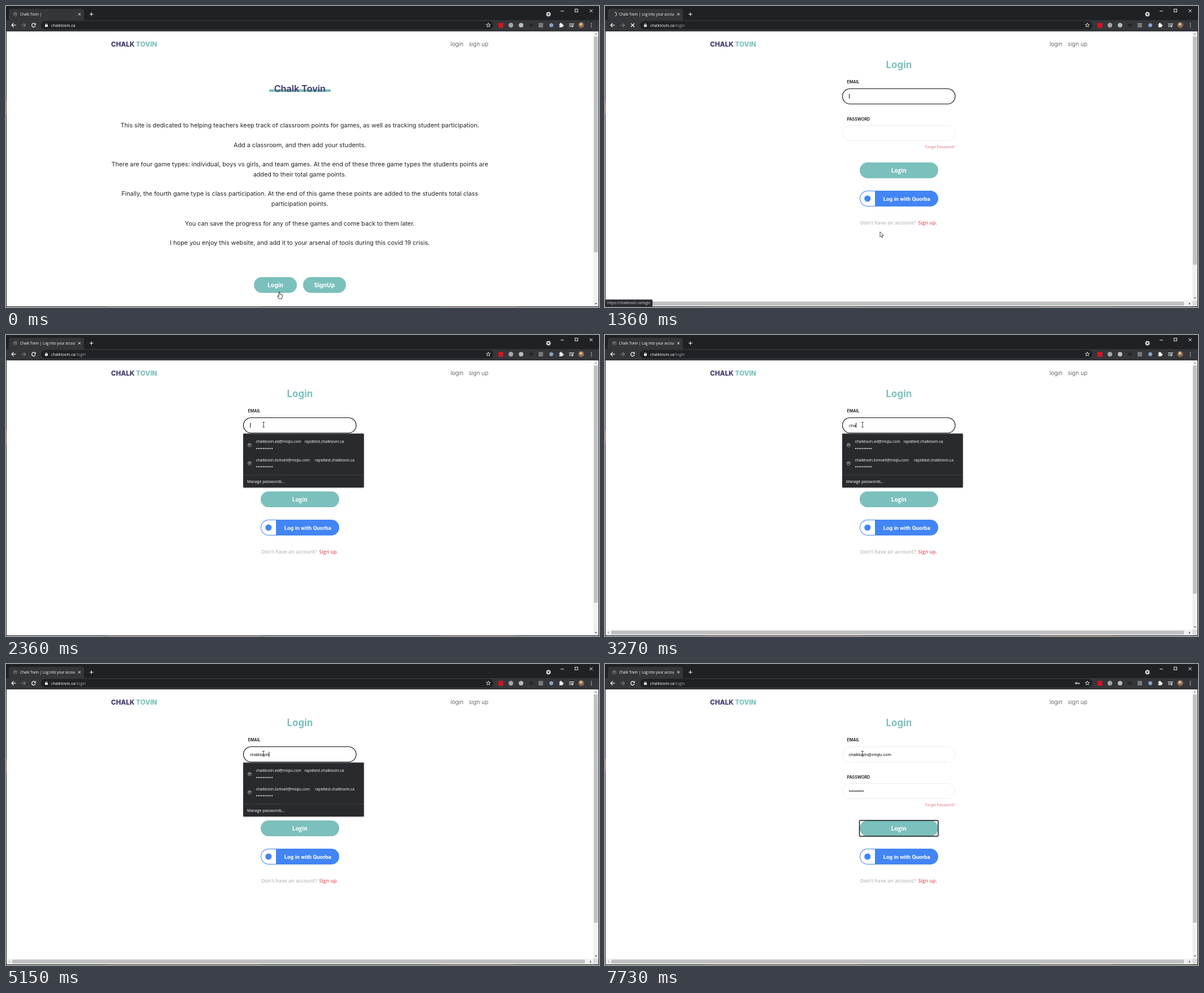
Animation of 1050x533 px, one loop 8000 ms. Source, as an HTML page with a canvas:

```html
<!DOCTYPE html>
<html lang="en">
<head>
<meta charset="utf-8">
<title>Login walkthrough</title>
<style>
html, body { margin: 0; width: 100%; height: 100%; overflow: hidden; background: #fff; }
canvas { display: block; }
</style>
</head>
<body>
<canvas id="stage" width="1050" height="533"></canvas>
<script>
const c = document.getElementById('stage').getContext('2d');
const LOOP = 8000;
const TEAL = '#7bc0bc', NAVY = '#43396a', BLUE = '#4285f4', PINK = '#e4767f', ICON = '#dfe1e5';
const SITE = 'Chalk Tovin', HOST = 'chalktovin.ca', MAIL = '@miqlu.com';

// Timeline in ms
const T = { load: 480, status: 470, commit: 1260, statusOff: 1850, loaded: 2010, click: 2360, hbar: 2880, tab: 6400, submit: 7730 };
const POPUPS = [[2360, 4530], [5120, 5350]];
const KEYS = [
  [2990, 'c'], [3110, 'h'], [3250, 'a'], [3300, 'l'], [3400, 'k'], [3500, 't'],
  [3660, 'o'], [3710, 'v'], [3760, 'i'], [3810, 'n'], [4530, 'E'], [4560, 'd'],
  [4990, '<'], [5090, '<'], [5350, '@'], [5510, 'm'], [5590, 'i'], [5660, 'q'],
  [5740, 'l'], [5820, 'u'], [6020, '.'], [6110, 'c'], [6210, 'o'], [6310, 'm']
];
const PASS_START = 6660, PASS_STEP = 85.5, PASS_LEN = 10;
const PATH = [
  [0, 484, 506], [30, 484, 506], [70, 483, 513], [150, 482, 521], [450, 482, 521], [500, 481, 505],
  [1240, 481, 505], [1270, 482, 494], [1360, 487, 400.5], [1500, 480, 300], [1700, 463, 205],
  [2040, 456.5, 169], [2110, 456.5, 166.5], [2200, 456.5, 166.5], [2320, 456, 158.5]
];

const inter = (w, s) => `${w} ${s}px Inter, sans-serif`;
const open = (w, s) => `${w} ${s}px "Open Sans", sans-serif`;
const FIELD = '7.5px "Liberation Sans", Arial, sans-serif';

function rect(x, y, w, h, fill) {
  c.fillStyle = fill;
  c.fillRect(x, y, w, h);
}
function round(x, y, w, h, r, fill, stroke, lw) {
  c.beginPath();
  c.roundRect(x, y, w, h, r);
  if (fill) { c.fillStyle = fill; c.fill(); }
  if (stroke) { c.strokeStyle = stroke; c.lineWidth = lw; c.stroke(); }
}
function disc(x, y, r, fill) {
  c.fillStyle = fill;
  c.beginPath();
  c.arc(x, y, r, 0, Math.PI * 2);
  c.fill();
}
function arc(x, y, r, a, b, color, lw) {
  c.strokeStyle = color;
  c.lineWidth = lw;
  c.beginPath();
  c.arc(x, y, r, a, b);
  c.stroke();
}
// Polyline through a flat list of coordinates
function poly(p, fill, stroke, lw) {
  c.beginPath();
  for (let i = 0; i < p.length; i += 2) c.lineTo(p[i], p[i + 1]);
  if (fill) { c.closePath(); c.fillStyle = fill; c.fill(); }
  if (stroke) { c.strokeStyle = stroke; c.lineWidth = lw; c.stroke(); }
}
function text(s, x, y, font, color, align = 'left') {
  c.font = font;
  c.fillStyle = color;
  c.textAlign = align;
  c.fillText(s, x, y);
  return c.measureText(s).width;
}
function cross(x, y, r, color, lw) {
  poly([x - r, y - r, x + r, y + r], null, color, lw);
  poly([x + r, y - r, x - r, y + r], null, color, lw);
}
function dots(n, x, y, step, r, color) {
  for (let i = 0; i < n; i++) disc(x + i * step, y, r, color);
}
function globe(x, y, color) {
  arc(x, y, 3.2, 0, 7, color, 0.8);
  poly([x - 2.4, y - 1.5, x, y - 1.8, x + .8, y, x - .8, y + .8, x - .4, y + 2.4], color);
  poly([x + 1, y - 2.6, x + 2.6, y - .6, x + 1.4, y + .8], color);
}

function chrome(t) {
  const login = t >= T.commit, loading = t >= T.load && t < T.loaded;
  rect(0, 0, 1050, 533, '#202124');
  round(5, 5, 133, 24, 4, '#35363a');
  rect(0, 25, 1050, 20, '#35363a');
  round(62, 26.5, 801, 15, 7.5, '#202124');

  if (loading) {
    const dir = login ? 1 : -1;
    const a = dir * (t - 1360) / 1000 * Math.PI * 2 - Math.PI / 2;
    arc(17, 14.5, 3.6, a, a + Math.PI * (login ? .9 : .5), login ? '#e8eaed' : '#9aa0a6', 1);
  } else globe(16.5, 14.5, '#85888c');
  c.save();
  c.beginPath();
  c.rect(24, 6, 98, 18);
  c.clip();
  text(SITE + ' |' + (login ? ' Log into your account' : ''), 25, 17, open(500, 6.3), '#fff');
  c.restore();
  cross(130, 14.5, 2, '#fff', 1);
  poly([148, 14.5, 154.5, 14.5], null, '#fff', 1);
  poly([151.2, 11.2, 151.2, 17.8], null, '#fff', 1);

  // window buttons
  disc(960.5, 14.5, 4, '#cfd1d4');
  poly([958.4, 13.4, 962.6, 13.4, 960.5, 16.2], '#202124');
  rect(982, 8.5, 6, 1, '#e8eaed');
  c.strokeStyle = '#e8eaed';
  c.lineWidth = 1;
  c.strokeRect(1007.5, 5.5, 5, 5);
  cross(1036, 8.5, 2.6, '#fff', 1);

  // navigation
  poly([17.5, 34, 10, 34], null, '#fff', 1.2);
  poly([13.6, 30.4, 10, 34, 13.6, 37.6], null, '#fff', 1.2);
  poly([27, 34, 34.5, 34], null, '#808387', 1.1);
  poly([31, 30.4, 34.6, 34, 31, 37.6], null, '#808387', 1.1);
  if (loading) cross(49, 34, 3, '#fff', 1.2);
  else {
    arc(49, 34, 3.2, .3, 5.3, '#fff', 1.2);
    poly([52.8, 30, 52.8, 33.4, 49.4, 33.4], '#fff');
  }
  rect(69, 33, 5, 4, ICON);
  arc(71.5, 32.8, 1.5, Math.PI, 0, ICON, .9);
  const w = text(HOST, 80, 36.6, open(500, 7.1), '#fff');
  if (login) text('/login', 80 + w, 36.6, open(500, 7.1), '#9aa0a6');

  if (t >= PASS_START) {
    arc(834.3, 34, 1.5, 0, 7, ICON, 1.1);
    rect(836, 33.4, 4.5, 1.3, ICON);
    rect(838.4, 34, 1.2, 2, ICON);
  }
  const star = [];
  for (let i = 0; i <= 10; i++) {
    const a = i * Math.PI / 5 - Math.PI / 2, r = i % 2 ? 1.7 : 3.9;
    star.push(854 + r * Math.cos(a), 34 + r * Math.sin(a));
  }
  poly(star, null, ICON, .9);

  // extensions
  rect(872, 30, 8.5, 8.5, '#d9131f');
  disc(894, 34, 4.2, '#a4a6a9');
  disc(912, 34, 4, '#b9bbbe');
  rect(926, 31.5, 7.5, 5, '#25262a');
  rect(943, 30, 8, 8, '#77797d');
  disc(965.5, 34, 3.5, '#8aa0c8');
  rect(979.6, 31.6, 6, 6, '#f1f3f4');
  disc(982.4, 31.2, 1.4, '#f1f3f4');
  disc(986, 34.6, 1.4, '#f1f3f4');
  disc(979.8, 34.8, 1, '#35363a');
  for (let i = 0; i < 3; i++) {
    rect(997, 31 + i * 2.4, i < 2 ? 6.4 : 4, 1, ICON);
    disc(1036.5, 31 + i * 3, .85, ICON);
  }
  rect(1003.6, 31, 1, 5, ICON);
  rect(1003.6, 31, 2.4, 1, ICON);
  disc(1002.8, 36.3, 1.4, ICON);
  disc(1018.5, 33.8, 5.2, '#8b6a48');
  disc(1018, 32.5, 2.4, '#d8c09c');
}

function scrollbars(thumbEnd, horizontal) {
  const end = horizontal ? 522 : 532;
  rect(1040, 45, 9, end - 45, '#f1f1f1');
  rect(1041, 54, 7, thumbEnd - 54, '#c1c1c1');
  poly([1042.4, 50.5, 1044.5, 48.2, 1046.6, 50.5], '#8a8a8a');
  poly([1042.4, end - 6, 1044.5, end - 3.7, 1046.6, end - 6], '#505050');
  if (!horizontal) return;
  rect(1, 522, 1039, 10, '#f1f1f1');
  rect(1040, 522, 9, 10, '#dcdcdc');
  rect(11, 523.5, 1014, 7, '#c1c1c1');
  poly([7, 525, 4.7, 527.1, 7, 529.2], '#a3a3a3');
  poly([1034, 525, 1036.3, 527.1, 1034, 529.2], '#505050');
}

function header() {
  const [a, b] = SITE.toUpperCase().split(' ');
  const w = text(a + ' ', 186, 71.5, inter(800, 11.7), NAVY);
  text(b, 186 + w, 71.5, inter(800, 11.7), TEAL);
  text('login', 787, 70.5, inter(300, 10.3), '#444');
  text('sign up', 854, 70.5, inter(300, 10.1), '#444', 'right');
}

const INTRO = [
  [215, 'This site is dedicated to helping teachers keep track of classroom points for games, as well as tracking student participation.'],
  [249.5, 'Add a classroom, and then add your students.'],
  [284, 'There are four game types: individual, boys vs girls, and team games. At the end of these three game types the students points are'],
  [302, 'added to their total game points.'],
  [336, 'Finally, the fourth game type is class participation. At the end of this game these points are added to the students total class'],
  [354, 'participation points.'],
  [388.5, 'You can save the progress for any of these games and come back to them later.'],
  [423, 'I hope you enjoy this website, and add it to your arsenal of tools during this covid 19 crisis.']
];

function home() {
  rect(466, 147.5, 109, 4.5, TEAL);
  text(SITE, 520.3, 152, inter(600, 16.2), NAVY, 'center');
  for (const [y, s] of INTRO) text(s, 520.2, y, inter(400, 10.8), '#212529', 'center');
  round(439, 480, 76, 28, 14, TEAL);
  text('Login', 477, 498, inter(700, 10.4), '#fff', 'center');
  round(526, 480, 76, 28, 14, TEAL);
  text('SignUp', 563.8, 498, inter(700, 10.4), '#fff', 'center');
  scrollbars(436, false);
}

function field(y, focused) {
  const color = focused ? '#101010' : '#ececee';
  round(420.5, y + .5, 199.5, 27, 13.5, '#fff', color, focused ? 1.15 : .9);
}

function typed(t) {
  let s = '';
  for (const [at, k] of KEYS) if (t >= at) s = k === '<' ? s.slice(0, -1) : s + k;
  return s;
}

// The caret restarts its blink after every key or focus change
function caretOn(t, dotCount) {
  let last = T.commit + 40;
  for (const at of [T.click, T.tab, ...KEYS.map(k => k[0])]) if (t >= at) last = Math.max(last, at);
  if (dotCount) last = PASS_START + (dotCount - 1) * PASS_STEP;
  return t >= last && Math.floor((t - last) / 520) % 2 === 0;
}

function form(t) {
  const onMail = t < T.tab, onPass = !onMail && t < T.submit;
  text('Login', 520.4, 110, inter(700, 16.9), TEAL, 'center');
  text('EMAIL', 428.5, 137.3, inter(600, 7.1), '#111');
  text('PASSWORD', 428.5, 202.5, inter(600, 7.1), '#111');
  field(146, onMail);
  field(211, onPass);

  const n = Math.max(0, Math.min(PASS_LEN, Math.floor((t - PASS_START) / PASS_STEP) + 1));
  const w = text(typed(t), onMail ? 432 : 431.5, 162.5, FIELD, '#111');
  dots(n, 433, 225, 2.65, 1, '#111');
  if (caretOn(t, n)) {
    if (onMail) rect(432 + w, 155.5, 1, 8.5, '#111');
    else if (onPass) rect(432 + n * 2.65, 220.5, 1, 8.5, '#111');
  }
  text('Forgot Password?', 620, 251.6, inter(400, 6.3), PINK, 'right');

  round(451, 277, 139, 28, 14, TEAL);
  if (t >= T.submit) round(450.5, 277, 139.5, 28, 1.5, null, '#101010', 1.4);
  text('Login', 520.3, 294.8, open(700, 10), '#fff', 'center');

  round(451, 327, 139, 28, 14, BLUE);
  round(452, 328, 26, 26, [13, 0, 0, 13], '#fff');
  disc(464.8, 341, 5.6, BLUE);
  text('Log in with Quorba', 534.3, 344.7, '700 9.9px Roboto, sans-serif', '#fff', 'center');

  text('Don\'t have an account?', 452, 387.2, open(600, 8.8), '#bcbcbc');
  text('Sign up.', 588, 387.2, open(600, 8.8), '#e0606f', 'right');

  const hbar = t < T.loaded || t >= T.hbar;
  scrollbars(hbar ? 458 : 474, hbar);
  if (POPUPS.some(([a, b]) => t >= a && t < b)) popup();
}

function popup() {
  const font = open(500, 6.7), white = '#fff';
  c.save();
  c.shadowColor = 'rgba(0,0,0,.35)';
  c.shadowBlur = 2;
  c.shadowOffsetY = 1;
  round(420, 174.5, 213.7, 95.5, 1, '#292a2d');
  c.restore();
  [['chalktovin.ed', 528.5], ['chalktovin.tomvell', 547]].forEach(([user, x], i) => {
    const y = 191.3 + i * 32.3;
    globe(431.3, y + 3.6, '#a5a8ac');
    text(user + MAIL, 442.5, y, font, white);
    text('rapidtest.' + HOST, x, y, font, white);
    dots(10, 443.8, y + 9.7, 3.05, .95, white);
  });
  rect(420, 247.5, 213.7, .8, '#46474b');
  text('Manage passwords...', 427, 261.8, open(500, 6.8), white);
}

function status() {
  round(0, 520, 84, 13, [0, 2, 0, 0], '#292a2d', '#4a4c50', .7);
  text('https://' + HOST + '/login', 4, 528.4, open(500, 6.35), '#d0d3d7');
}

function pointerAt(t) {
  const i = PATH.findIndex(p => p[0] > t);
  if (i < 0) return PATH[PATH.length - 1].slice(1);
  const [a, x, y] = PATH[i - 1], [b, u, v] = PATH[i], k = (t - a) / (b - a);
  return [x + (u - x) * k, y + (v - y) * k];
}

function pointer(t) {
  const [x, y] = pointerAt(t);
  const within = (a, b) => y >= a && y <= b;
  let kind = 'arrow';
  if (t < T.commit) kind = y < 508 ? 'hand' : 'arrow';
  else if (within(277, 305) || within(327, 355)) kind = 'hand';
  else if (within(146, 174) || within(211, 239)) kind = 'beam';

  c.save();
  c.translate(x, y);
  c.lineJoin = 'round';
  if (kind === 'beam') {
    poly([0, -4, 0, 4.5], null, '#111', .8);
    for (const h of [-4, 4.5]) poly([-1.9, h, 1.9, h], null, '#111', .8);
  } else if (kind === 'arrow') {
    poly([0, 0, 0, 9, 2, 7.2, 3.4, 10.3, 4.8, 9.7, 3.5, 6.7, 6.3, 6.5, 0, 0], '#fff', '#222', .8);
  } else {
    poly([-.8, .6, 0, 0, .8, .6, .9, 4, 2.2, 4.1, 3.6, 4.6, 5, 5.2, 5.5, 6.2, 5.2, 9, 4.4, 12.4,
      -.6, 12.4, -3.4, 8, -3, 7, -2, 7, -.8, 8.4, -.8, .6], '#fff', '#222', .9);
    for (const h of [2, 3.4]) poly([h, 4.6, h, 6.6], null, '#555', .5);
  }
  c.restore();
}

function frameEdge() {
  rect(0, 45, 1, 488, '#231f20');
  rect(0, 168, 1, 24, '#7a4a24');
  rect(1049, 45, 1, 488, '#2a2a2c');
  rect(0, 532, 1050, 1, '#1b1516');
  rect(180, 532, 270, 1, '#3a211b');
  rect(770, 532, 130, 1, '#45261d');
}

function draw(t) {
  chrome(t);
  rect(1, 45, 1048, 487, '#fff');
  header();
  if (t < T.commit) home();
  else form(t);
  frameEdge();
  if (t >= T.status && t < T.statusOff) status();
  pointer(t);
}

function tick() {
  draw(performance.now() % LOOP);
  requestAnimationFrame(tick);
}
tick();
</script>
</body>
</html>
```
